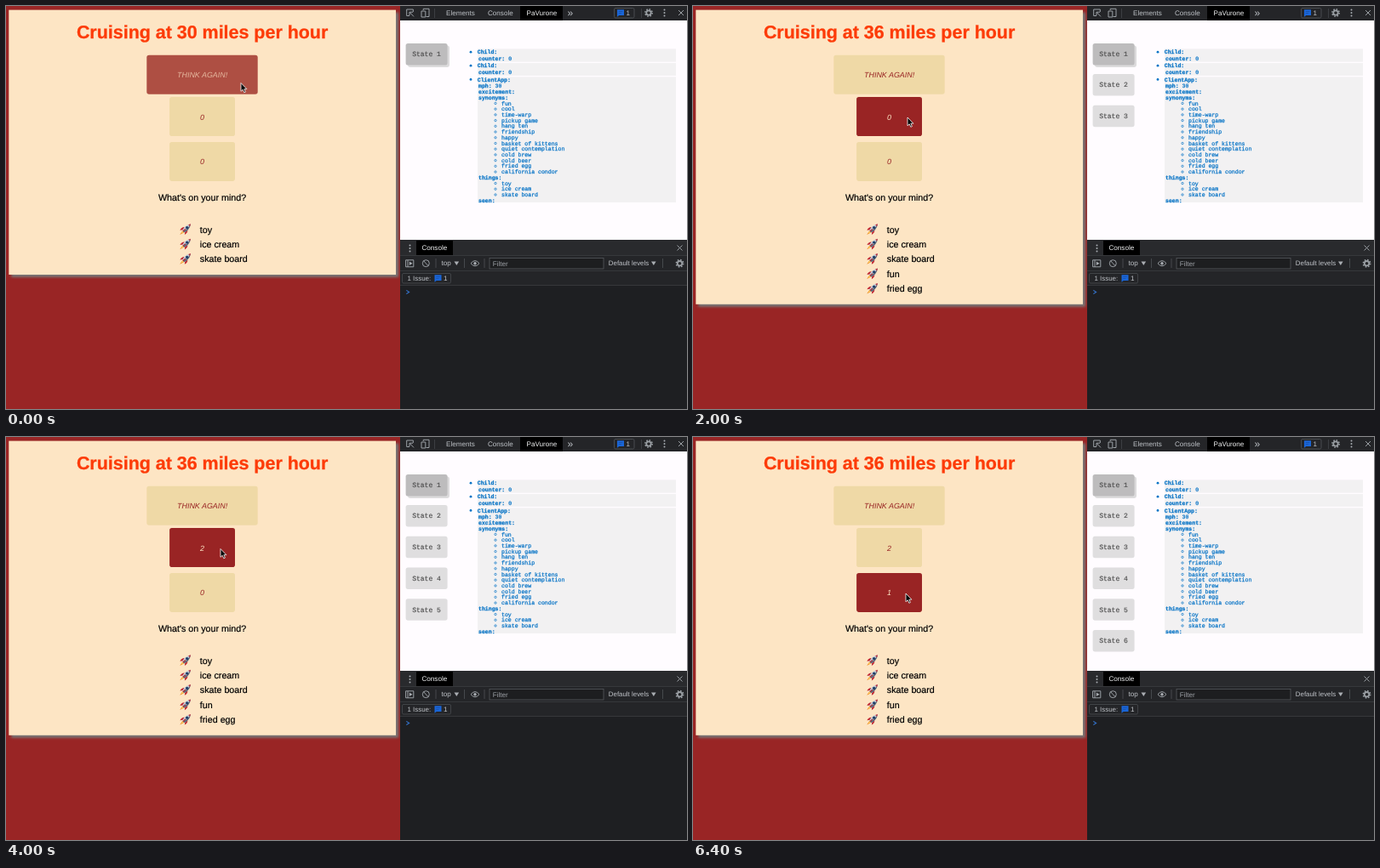
Animation, 800 px wide and 474 px high, one loop 6450 ms. Source, as an HTML page:

```html
<!DOCTYPE html>
<html lang="en">
<head>
<meta charset="utf-8">
<title>Cruising</title>
<style>
  html, body { margin: 0; width: 100%; height: 100%; overflow: hidden; background: #992525; }
  svg { display: block; width: 800px; height: 474px; }
  text { font-family: "Liberation Sans", Arial, sans-serif; text-rendering: geometricPrecision; }
  .title { font-size: 21.44px; font-weight: bold; fill: #fd3b08; stroke: #fd3b08; stroke-width: .3; text-anchor: middle; }
  .body { font-size: 10.72px; fill: #000; stroke: #000; stroke-width: .2; }
  .label { font-size: 8.93px; font-style: italic; text-anchor: middle; }
  .ui { font-size: 8.1px; fill: #bfc3c8; }
  .mono { font-family: "Liberation Mono", "Courier New", monospace; }
  .state { font-size: 8.04px; fill: #4c4c4c; stroke: #4c4c4c; stroke-width: .15; text-anchor: middle; }
  .tree { font-size: 6.53px; fill: #0673c6; stroke: #0673c6; stroke-width: .25; }
  .bold { font-weight: bold; }
  .line { fill: none; stroke: #9ba0a5; stroke-width: 1; }
  .dots { fill: #a9adb2; }
  #card { filter: drop-shadow(3.6px 3.6px 1.6px #777); }
</style>
</head>
<body>
<svg id="stage" viewBox="0 0 800 474" xmlns="http://www.w3.org/2000/svg">
  <defs>
    <g id="rocket">
      <path d="M3.6 8 L.2 12.9 L5.4 10.2Z" fill="#f08a1c"/>
      <path d="M3.6 8.8 L1.6 11.7 L4.6 10Z" fill="#fde06a"/>
      <path d="M5.8 4.1 Q2.2 3.8 .4 7.7 L4 7.2Z M9.3 7.6 Q9.7 11 5.9 13 L6.2 9.4Z" fill="#c02a35"/>
      <path d="M3.2 8.2 Q5.2 2.2 13 .3 Q11.6 8 5.2 10.3Z" fill="#c3cad4"/>
      <path d="M4.1 9.2 Q9.5 6.6 13 .3 Q11.6 8 5.2 10.3Z" fill="#5a6474"/>
      <path d="M10.2 1.3 L13 .3 L12.1 3.2Z" fill="#c02a35"/>
      <circle cx="8.6" cy="4.6" r="1.6" fill="#1d3d68"/>
      <path d="M3.8 9 L7 6.4" stroke="#9c2230" stroke-width="1.2"/>
    </g>
    <g id="bubble">
      <path d="M0 0H8V6.6H2.2L0 8.4Z" fill="#1a66d8"/>
      <path d="M1.7 2.2H6.3M1.7 4.3H5" stroke="#174ea6" stroke-width=".8"/>
    </g>
    <g id="kebab" class="dots">
      <circle cy="-3.4" r="1"/><circle r="1"/><circle cy="3.4" r="1"/>
    </g>
    <path id="cross" class="line" d="M-3 -3L3 3M3 -3L-3 3"/>
    <g id="gear" class="line">
      <circle r="2.7" stroke-width="1.8"/>
      <circle r="4.2" stroke-width="1.5" stroke-dasharray="1.65 1.65"/>
    </g>
    <path id="drop" class="dots" d="M0 0H5.6L2.8 4.4Z"/>
  </defs>

  <rect width="800" height="474" fill="#992525"/>
  <rect id="card" x="3.3" y="4.6" width="454.7" fill="#fde5c4"/>
  <text id="title" class="title" x="230.6" y="38.2"></text>
  <g id="buttons"></g>
  <text class="body" x="178.9" y="229">What's on your mind?</text>
  <g id="thoughts"></g>

  <g id="panel">
    <rect x="463" width="337" height="474" fill="#1e1f22"/>
    <rect x="463" width="337" height="17" fill="#242528"/>
    <rect x="604" width="50" height="17" fill="#000"/>
    <path class="line" d="M474 11.5H470.7V4H478.3V7M474 7.2L479 12.4M474 7.2V11M474 7.2H478"/>
    <path class="line" d="M490.2 5V3.3H497V12.5H493.5M488 6H492.8V13H488Z"/>
    <path d="M503.5 3V14M746.5 3V14" stroke="#3c3e42"/>
    <text class="ui" x="517" y="10.7">Elements</text>
    <text class="ui" x="566" y="10.7">Console</text>
    <text class="ui" x="611.5" y="10.7" style="fill:#f0f1f2">PaVurone</text>
    <text class="ui" x="659.5" y="11.6" style="font-size:12px">»</text>
    <rect x="714.5" y="2.5" width="23.5" height="11.5" rx="1.5" fill="none" stroke="#494c50"/>
    <use href="#bubble" x="718" y="4.3"/>
    <text class="ui" x="728.6" y="10.7">1</text>
    <use href="#gear" x="755" y="8"/>
    <use href="#kebab" x="773.5" y="8"/>
    <use href="#cross" x="793" y="8"/>

    <rect x="463" y="17" width="337" height="258" fill="#fffcff"/>
    <g id="states"></g>
    <g id="tree" transform="translate(0 .4)"></g>

    <rect x="463" y="275" width="337" height="18" fill="#292a2d"/>
    <rect x="482" y="276" width="43" height="17" fill="#000"/>
    <use href="#kebab" x="474.5" y="285"/>
    <text class="ui" x="488.5" y="287.4" style="fill:#f0f1f2">Console</text>
    <use href="#cross" x="791.5" y="284.5"/>

    <rect x="463" y="293" width="337" height="35.5" fill="#242528"/>
    <path d="M463 293.5H800M463 311.5H800M463 328.5H800" stroke="#3b3d41" stroke-width=".8"/>
    <path d="M505 297V308M538.5 297V308M562 297V308M771.5 297V308" stroke="#46494d"/>
    <path class="line" d="M469.6 298.8H478.8V306.8H469.6ZM472 299V307"/>
    <path class="dots" d="M473.8 300.6L477.6 302.8L473.8 305Z"/>
    <path class="line" d="M490.6 299.8L496 305.6"/>
    <circle class="line" cx="493.3" cy="302.7" r="4"/>
    <text class="ui" x="511.5" y="305.2">top</text>
    <use href="#drop" x="526.5" y="300.6"/>
    <path class="line" d="M546 302.7Q551 296.5 556 302.7Q551 308.9 546 302.7Z"/>
    <circle class="dots" cx="551" cy="302.7" r="1.7"/>
    <rect x="568" y="296.5" width="134" height="12.5" fill="#1d1e20" stroke="#55585c" stroke-width=".8"/>
    <text class="ui" x="571.8" y="305.6" style="fill:#9da1a6">Filter</text>
    <text class="ui" x="707.8" y="305.2" style="font-size:7.9px">Default levels</text>
    <use href="#drop" x="758" y="300.6"/>
    <use href="#gear" x="791.5" y="302.7"/>
    <rect x="465.5" y="314.5" width="57" height="11.5" rx="1.5" fill="none" stroke="#494c50" stroke-width=".8"/>
    <text class="ui" x="471.5" y="323" style="font-size:7.9px">1 Issue:</text>
    <use href="#bubble" x="503.5" y="316.3"/>
    <text class="ui" x="514" y="323">1</text>
    <path d="M470.3 334.4L473.6 336.5L470.3 338.6" fill="none" stroke="#3474cf" stroke-width="1.1"/>
  </g>

  <g id="ring" fill="none">
    <circle r="13" stroke="#fff" stroke-width="4.2"/>
    <circle r="13" stroke="#0b0b0b" stroke-width="2.6"/>
  </g>
  <path id="cursor" d="M0 0V9.8L2.2 7.8L3.8 11.3L5.4 10.6L3.9 7.2H6.9Z" fill="#000" stroke="#fff" stroke-width=".8"/>
</svg>

<script>
const LOOP = 6450, STEP = 50, FADE = 250, PRESS = 150;
const TAN = [239, 217, 166], BROWN = [153, 36, 36], CREAM = [253, 229, 196];
const $ = id => document.getElementById(id);

// Each click takes effect on release.
const clicks = [
  { at: 450, target: 0 }, { at: 1200, target: 0 },
  { at: 2850, target: 1 }, { at: 3700, target: 1 },
  { at: 5900, target: 2 }
];

const buttons = [
  { x: 165.3, y: 57.8, w: 130.4, hover: [-190, 1650] },
  { x: 192.1, y: 107.1, w: 76.9, hover: [1750, 4250] },
  { x: 192.1, y: 159.9, w: 76.9, hover: [4750, LOOP + FADE] }
];

const cursorPath = [
  [0, 276, 90.5], [350, 269, 90], [1400, 268.5, 90], [1950, 252, 131],
  [4000, 252, 131.5], [4450, 253, 155.5], [4650, 253, 155.5],
  [5050, 251, 184.5], [LOOP, 250, 184]
];

const thoughts = ["toy", "ice cream", "skate board", "fun", "fried egg"];
const synonyms = ["fun", "cool", "time-warp", "pickup game", "hang ten", "friendship", "happy",
  "basket of kittens", "quiet contemplation", "cold brew", "cold beer", "fried egg", "california condor"];

$("buttons").innerHTML = buttons.map(b =>
  `<rect x="${b.x}" y="${b.y}" width="${b.w}" height="46" rx="2.8"/>
   <text class="label" x="230.6" y="${b.y + 26.4}"></text>`).join("");
buttons.forEach((b, i) => [b.box, b.label] = [...$("buttons").children].slice(i * 2, i * 2 + 2));

$("thoughts").innerHTML = thoughts.map((word, i) => {
  const y = 266.6 + i * 17.4;
  return `<g><use href="#rocket" x="204" y="${y - 10.6}"/><text class="body" x="227.8" y="${y}">${word}</text></g>`;
}).join("");

$("states").innerHTML = Array.from({ length: 6 }, (_, i) => {
  const y = i ? 43.2 + i * 36.75 : 44;
  const shadow = i ? "" : `<rect x="472" y="46.5" width="49" height="25.5" rx="3" fill="#dcdbdc"/>`;
  return `<g>${shadow}<rect x="469.6" y="${y}" width="49" height="25.5" rx="2.6" fill="${i ? "#dfdedf" : "#bdbcbd"}"/>
    <text class="mono state" x="494" y="${y + 15.4}">State ${i + 1}</text></g>`;
}).join("");

function buildTree() {
  const block = (y, h) => `<rect x="554" y="${y}" width="233" height="${h}" fill="#f2f1f2"/>`;
  const row = (x, y, key, value = "") =>
    `<text class="mono tree" x="${x}" y="${y}"><tspan class="bold">${key}</tspan>${value}</text>`;
  const head = (y, name) =>
    `<circle cx="546" cy="${y - 2.2}" r="1.4" fill="#0673c6"/>` + row(553.8, y, name + ":");
  let out = block(50, 15.3) + block(66.7, 14.8) + block(83, 147.6);
  for (const y of [56, 72]) out += head(y, "Child") + row(555, y + 7.7, "counter:", " 0");
  out += head(88.2, "ClientApp") + row(555, 96, "mph:", " 30");
  let y = 96;
  const list = (name, items) => {
    out += row(555, y += 6.72, name + ":");
    for (const item of items) {
      y += 6.72;
      out += `<circle cx="575" cy="${y - 2.1}" r="1.2" fill="none" stroke="#0673c6" stroke-width=".7"/>`
        + row(582, y, "", item);
    }
  };
  list("excitement", []);
  list("synonyms", synonyms);
  list("things", thoughts.slice(0, 3));
  list("seen", []);
  $("tree").innerHTML = out;
}
buildTree();

const clamp = v => Math.max(0, Math.min(1, v));
const ease = u => u * u * (3 - 2 * u);
const mix = (a, b, p) => `rgb(${a.map((v, i) => Math.round(v + (b[i] - v) * p))})`;
const showFirst = (id, n) => [...$(id).children].forEach((el, i) =>
  el.setAttribute("visibility", i < n ? "visible" : "hidden"));

function cursorAt(t) {
  const i = cursorPath.findIndex(k => k[0] > t);
  const [t0, x0, y0] = cursorPath[i - 1], [t1, x1, y1] = cursorPath[i];
  const u = ease((t - t0) / (t1 - t0));
  return [x0 + (x1 - x0) * u, y0 + (y1 - y0) * u];
}

function draw(t) {
  const done = clicks.filter(c => t >= c.at);
  const count = target => done.filter(c => c.target === target).length;
  const added = count(0);

  $("title").textContent = `Cruising at ${30 + 3 * added} miles per hour`;
  $("card").setAttribute("height", 311.4 + 17.4 * added);
  showFirst("thoughts", 3 + added);
  showFirst("states", 1 + done.length);

  buttons.forEach((b, i) => {
    const [enter, leave] = b.hover;
    const p = clamp((t - enter) / FADE) * (1 - clamp((t - leave) / FADE));
    b.box.setAttribute("fill", mix(TAN, BROWN, p));
    b.label.setAttribute("fill", mix(BROWN, CREAM, p));
    b.label.textContent = i ? count(i) : "THINK AGAIN!";
  });

  const place = `translate(${cursorAt(t).map(v => v.toFixed(2))})`;
  const pressed = clicks.some(c => t >= c.at - PRESS && t < c.at);
  $("cursor").setAttribute("transform", place);
  $("ring").setAttribute("transform", place);
  $("ring").setAttribute("visibility", pressed ? "visible" : "hidden");
}

const start = performance.now();
function tick() {
  const t = (performance.now() - start) % LOOP;
  draw(Math.floor(t / STEP) * STEP);
  requestAnimationFrame(tick);
}
tick();
</script>
</body>
</html>
```
